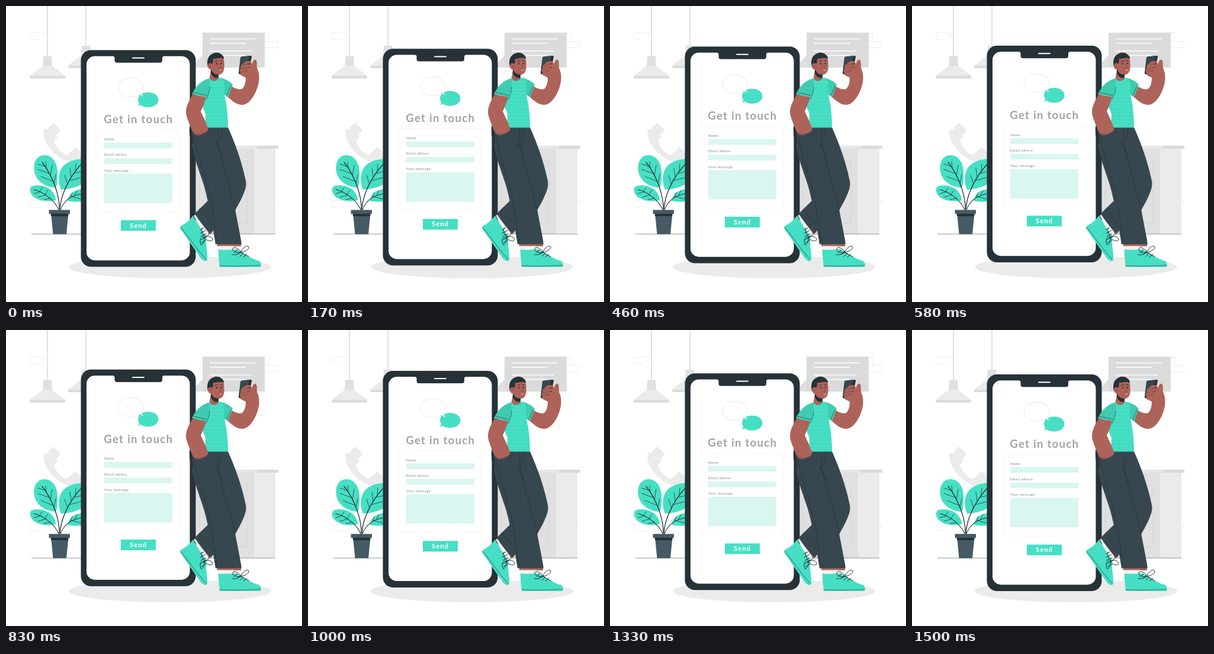
Animation, 500 px wide and 500 px high, one loop 1.54 s. Source, as an HTML page:

```html
<!DOCTYPE html>
<html lang="en">
<head>
<meta charset="utf-8">
<title>Get in touch</title>
<style>
html, body { margin: 0; width: 100%; height: 100%; overflow: hidden; background: #fff; }
svg { display: block; width: 100vw; height: 100vh; }
text { font-family: Lato, Inter, sans-serif; font-weight: 700; }
.mint { fill: #46dfc3; }
.sleeve { fill: #40cbb1; }
.dark { fill: #263238; }
.slate { fill: #37474f; }
.skin { fill: #ad6359; }
.line { fill: none; stroke: #263238; stroke-linecap: round; stroke-linejoin: round; }
.label { font-size: 5.6px; font-weight: 400; letter-spacing: .68px; fill: #777; }
.field { fill: #d9f6f1; }
</style>
</head>
<body>
<svg viewBox="0 0 500 500">
  <defs>
    <pattern id="stripes" width="10" height="6" y="123" patternUnits="userSpaceOnUse">
      <path d="M0 3H10" stroke="#2fc6ab" stroke-width=".6" opacity=".55"/>
    </pattern>
    <g id="lamp">
      <path d="M0-85V0" stroke="#d6d6d6" stroke-width="1.4"/>
      <path d="M-7-.5H7L8 16H-8Z" fill="#e0e0e0"/>
      <path d="M-8 16H8L30 33H-30Z" fill="#ebebeb"/>
      <path d="M-30 33H30V36Q30 37.500 28 37.500H-28Q-30 37.500-30 36Z" fill="#dbdbdb"/>
    </g>
    <path id="shirt" d="M344 122C348 129 356 128 360 121C365 122 368 125 369 131C367 145 370 154 372 165C374 178 375 192 375 205.500H336L337 182L331 168L338 154L344 137Z"/>
  </defs>

  <!-- room -->
  <g fill="none" stroke="#ececec" stroke-width=".9">
    <path d="M67 45.500H41V56.500H54M60 51H67V45.500"/>
    <path d="M437 45.500H444V58M437 59.500H459V70.500H437"/>
    <path d="M63 328.500H41V339.500H62M448 328.500H458.500V335"/>
  </g>
  <use href="#lamp" x="70" y="85"/>
  <use href="#lamp" x="135" y="67.500"/>
  <path d="M319 97L332 83V104H319Z" fill="#e0e0e0"/>
  <path d="M332 45H437V104H332Z" fill="#dbdbdb"/>
  <path d="M344 55.500H422M344 63H405M344 76H415M344 83.500H404" stroke="#fff" stroke-width="1.5"/>
  <g fill="#ebebeb">
    <path d="M64 207.500C61 217 66 232 78 245C89 257 103 264 114 264L121 257L109 246L102 252C94 249 84 239 81 228L87 221L75 209Z"/>
    <path d="M80 197L92.500 209.500L84 219L70 206Z"/>
    <path d="M117 238L132 252V265L126 263L109 247Z"/>
  </g>
  <path d="M310 241H419V385H310Z" fill="#e0e0e0"/>
  <path d="M419 241H455V385H419Z" fill="#ebebeb"/>
  <path d="M310 236H424V241H310Z" fill="#e6e6e6"/>
  <path d="M424 236H460V241H424Z" fill="#d9d9d9"/>
  <path d="M326.500 262H407V284H326.500ZM326.500 291.500H407V366H326.500Z" fill="none" stroke="#cfcfcf" stroke-width=".7"/>
  <path d="M43 385.200H455" stroke="#263238" stroke-width=".5"/>
  <ellipse cx="277" cy="441" rx="171" ry="19" fill="#ebebeb"/>

  <!-- plant -->
  <g class="mint">
    <path d="M84 307C68 306 51 297 48 280C45 265 52 252 65 252C80 252 88 268 87 284C87 294 87 302 84 307Z"/>
    <path d="M93 310C88 299 87 281 97 270C107 260 126 256 136 260V296C126 304 108 310 93 310Z"/>
    <path d="M84 328C74 331 58 330 49 324C41 319 38 309 43 305C51 301 67 303 76 311C81 316 84 322 84 328Z"/>
    <path d="M104 329C106 318 114 311 128 309L136 309V328C126 332 112 331 104 329Z"/>
  </g>
  <g class="line" stroke-width=".8">
    <path d="M90 344C91 322 80 288 61 264" stroke-width="1.300"/>
    <path d="M91 344C92 321 105 290 130 264" stroke-width="1.300"/>
    <path d="M89 344C82 328 65 315 47 310" stroke-width="1.100"/>
    <path d="M92 344C98 329 110 319 130 317" stroke-width="1.100"/>
    <path d="M68 274L67 263M75 287L78 269M81 300L84 285M66 271L54 267M73 283L54 276M79 296L59 288"/>
    <path d="M117 279L118 267M110 289L108 274M104 301L99 286M114 283L130 279M107 295L126 290"/>
    <path d="M57 313L61 307M66 318L71 311M58 314L47 317M67 319L54 323M75 325L64 327M109 323L112 315M116 319L120 312M111 322L126 326"/>
  </g>
  <path d="M76 350H105.500L102 385.500H79.500Z" fill="#455a64"/>
  <path d="M75.500 351H105.500L105 355H76Z" class="dark"/>
  <path d="M72.500 344.500H108V351H72.500Z" fill="#455a64"/>

  <!-- floating screen -->
  <g id="phone">
    <rect x="126.500" y="74.800" width="194" height="366" rx="17" class="dark"/>
    <path d="M150 85H180Q183.500 85 183.500 88V92Q183.500 96 187.500 96H260Q264 96 264 92V88Q264 85 267.500 85H296.500A14 14 0 0 1 310.500 99V416A14 14 0 0 1 296.500 430H150A14 14 0 0 1 136 416V99A14 14 0 0 1 150 85Z" fill="#fff"/>
    <path d="M214 88H233" stroke="#fff" stroke-width="2" stroke-linecap="round"/>
    <path class="mint" d="M227 167.500C231 170 235 171.300 240 171.300C250 171.300 257.500 165.800 257.500 158.500C257.500 151.500 250 146 240 146C230.500 146 223 151.500 223 158.500Q223 162 225 164.500Q225 167.500 222.500 169.500Q225 169.500 227 167.500Z"/>
    <path class="mint" d="M227 156L224.500 149L231 152Z"/>
    <path d="M226 149.500C222 152.500 217 154 210.500 154C198.500 154 189.300 147 189.300 138C189.300 129 198.500 122 210.500 122C222.500 122 231.700 129 231.700 138C231.700 141.500 230.500 145 228.500 147.500Q229 150 232 152.500Q228 152 226 149.500Z" fill="#fff" stroke="#dedede" stroke-width=".7"/>
    <text x="165.300" y="198.800" font-size="18.600" letter-spacing="1.250" fill="#a3a3a3">Get in touch</text>
    <path d="M154.500 209.500H292.500V347.500H154.500Z" fill="none" stroke="#f2f2f2" stroke-width=".8"/>
    <text class="label" x="166" y="227.400">Name</text>
    <text class="label" x="166" y="253.700">Email adress</text>
    <text class="label" x="166" y="280">Your message</text>
    <path class="field" d="M166 231.200H281V240.800H166ZM166 257.500H281V267H166ZM166 283.500H281V333H166Z"/>
    <path class="mint" d="M194 362.200H253V380.200H194Z"/>
    <text x="209" y="375" font-size="11.300" letter-spacing="1" fill="#fff">Send</text>
  </g>

  <!-- far leg and shoe -->
  <path d="M317 354L324 351L346 383L339 390Z" fill="#f2f2f2"/>
  <path d="M319 351L323 347L349 382L344 386Z" class="skin"/>
  <path class="mint" d="M316 354C311 361 304 367 296 371Q293 374 295 377L329 426C333 431 339 433 340 428C341 416 336 402 339 389C331 380 323 367 316 354Z"/>
  <path class="line" d="M295 374C308 389 322 411 338 428" stroke-width=".7"/>
  <g class="line" stroke-width="1">
    <path d="M328 378L334 375M328 384L337 379M329 389L338 385M329 395L338 390M330 400L337 396"/>
    <path d="M335 390C339 387 350 390 349 395C347 399 338 396 334 391C328 389 326 397 330 404C334 401 336 396 335 390"/>
    <path d="M335 390C331 383 329 378 331 375M335 391C341 390 343 385 343 381"/>
  </g>
  <path class="slate" d="M342 205H375C387 232 398 262 404 291Q407 301 404 310C399 325 391 338 386 347L345 384Q330 369 319 351C328 341 337 333 344 326L364 290Z"/>
  <path class="line" d="M327 344C337 353 346 365 351 376M358 232C361 242 363 250 366 258" stroke-width=".7"/>

  <!-- near leg and shoe -->
  <path d="M357 401H397V406H357Z" class="skin"/>
  <path d="M358 405.500H385L391 412H359Z" fill="#f2f2f2"/>
  <path class="mint" d="M358.500 411C366 413 380 411 390 411C402 418 414 427 428 431Q432 434 430 441H361Q359 426 358.500 411Z"/>
  <path class="line" d="M361 438.500C382 440 407 439 430 438" stroke-width=".6"/>
  <g class="line" stroke-width="1">
    <path d="M385 417L391 412M390 420L396 414M395 423L401 417M401 424L407 419"/>
    <path d="M397 416C393 408 384 406 383 410C382 415 391 418 397 416C399 408 408 403 410 407C411 411 404 415 397 416"/>
    <path d="M397 416C391 420 386 421 382 420M397 416C402 420 407 422 410 423"/>
  </g>
  <path class="slate" d="M310 204H374L372 215C364 219 359 225 357 232C365 266 377 303 385 335L398 402.500H354C349 371 342 329 334 302C326 277 317 255 314 235Q309 217 310 204Z"/>
  <g class="line" stroke-width=".7">
    <path d="M357 207C359 217 358 226 354 235L358 241M364 207C364 217 363 225 358 231"/>
    <path d="M357 232C365 267 377 303 385 335L397 398M317 218C323 254 341 296 348 339L356 397M344 212C342 216 340 218 337 219"/>
  </g>
  <path class="dark" d="M310 205L314 204L316 232L314 235Q309 217 310 205Z"/>

  <!-- raised arm -->
  <path class="skin" d="M379 134C387 140 394 142 399 140C404 135 405 128 405 121L397 117C392 111 393 102 397 98L403 94C410 91 414 95 416 98C416 94 419 90 422 91C425 95 423 101 424 105C429 114 428 126 426 133C423 146 415 160 406 165C395 171 383 162 372 151Z"/>
  <path class="sleeve" d="M360 121C369 122 378 127 383 133L375 154L364 147Z"/>
  <path class="line" d="M380 135L373 151" stroke-width=".6"/>

  <!-- torso -->
  <path class="skin" d="M346 109L359 113V124C356 130 348 131 343 125Z"/>
  <use href="#shirt" fill="#46dfc3"/>
  <use href="#shirt" fill="url(#stripes)"/>
  <path class="sleeve" d="M344 122C329 126 320 136 314 149L338.500 154.500C341 149 344 144 344.500 137Z"/>
  <path class="line" d="M344 137C344 145 341 151 338 158M317 146L339 151" stroke-width=".6"/>
  <path class="skin" d="M315 149.500L338 154C336 163 332 170 329 178C333 187 338 196 341 206C343 212 336 215 330 217C322 220 316 217 314 210C311 200 304 188 304 179C304 169 310 159 315 149.500Z"/>
  <path class="line" d="M314 211C319 219 331 218 341 211" stroke-width=".5"/>

  <!-- head -->
  <path class="skin" d="M347 86H367C369 95 369.500 105 367 111C363 118 352 119 346 111Z"/>
  <path class="dark" d="M346 105C348 113 353 116 359 115.500L359 121C353 123 348 119 346 113Z"/>
  <path class="dark" d="M341 103C339 96 340 88 344 84C349 79 357 77 363 81Q368 84 368 89C362 86 355 89 350 89Q350 95 348 99L346 106Z"/>
  <path class="skin" d="M349 99C346 94 340 97 341 102C342 107 346 109 349 106Z"/>
  <circle cx="356" cy="97.500" r="1.200" class="dark"/>
  <circle cx="364" cy="97" r="1.200" class="dark"/>
  <path class="line" d="M353 94Q355 91.500 358 93M362 92.500Q365 91.500 366 93.500" stroke-width="1"/>
  <path d="M361 98L363 104L360 104.500M343 100Q346 100 346 104" fill="none" stroke="#7b3f38" stroke-width=".7"/>
  <path d="M357 107Q362 109 366 106.500Q363 111.500 357 107Z" fill="#fff" stroke="#7b3f38" stroke-width=".4"/>

  <!-- handset -->
  <path class="dark" d="M398 85.500L413 84Q415.500 84 415 86.500L409 114Q408.500 116 406 116L394 115Q392.500 115 393 113L396 87.500Q396 86 398 85.500Z"/>
  <path class="slate" d="M397 86L411 84.500L405 115.500L393.500 114.500Z"/>
  <path class="skin" d="M401 97Q403 93 410 93Q414 93 414 96L405 99Q413 97 415 100Q414 103 405 104Q412 103 412 106Q410 109 404 109Q410 110 409 113Q406 118 399 117Q395 115 396 111Q393 107 397 105Q394 101 401 97Z"/>
  <path d="M398 102Q403 98 409 98M397 107Q402 104 409 104M397 112Q402 109 407 109" fill="none" stroke="#7b3f38" stroke-width=".6"/>
  <path class="skin" d="M408 107C414 107 416 101 417 96Q419 90 422 91Q424 93 423 99L425 110L413 123L403 119Z"/>
</svg>
<script>
const LOOP = 1540, RISE = 10, LEAD = 55, REST = .4;
const phone = document.getElementById("phone");

// Linear rise and fall
function draw(ms) {
  const p = ((ms + LEAD) % LOOP) / LOOP;
  const lift = RISE * (1 - Math.abs(1 - 2 * p));
  phone.setAttribute("transform", `translate(0 ${(REST - lift).toFixed(3)})`);
}

function tick() {
  draw(performance.now());
  requestAnimationFrame(tick);
}
tick();
</script>
</body>
</html>
```
